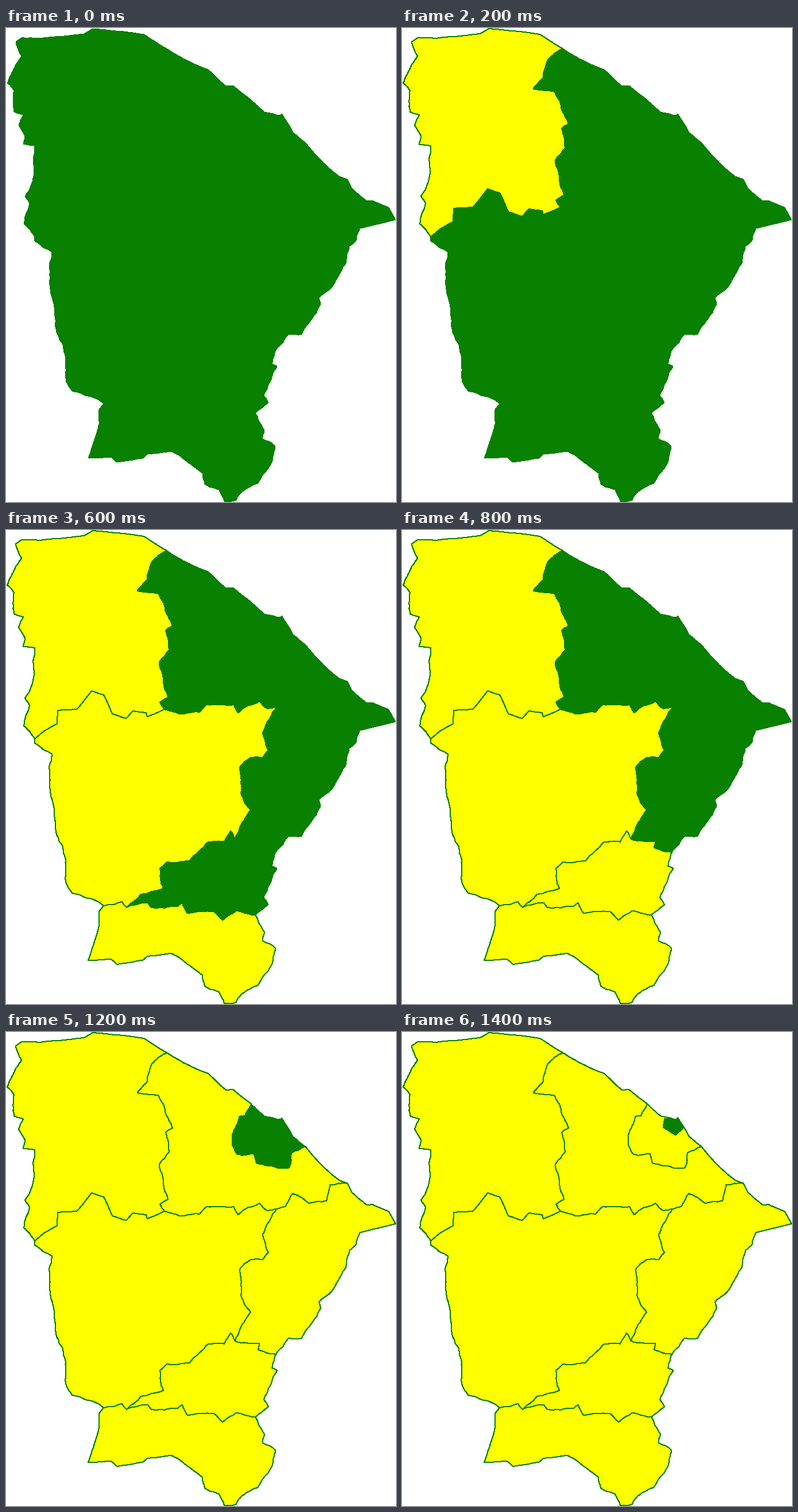
A matplotlib script for the animation above (1.6 s loop, 679 px wide and 825 px high).

```python
import numpy as np
import matplotlib.pyplot as plt
from matplotlib.animation import FuncAnimation
from matplotlib.patches import Polygon

W, H, DPI = 679, 825, 64
GREEN, YELLOW = "#088000", "#ffff00"
LINE = 1.0 * 72 / DPI
SMOOTH, RUGGED = 0.02, 0.07
rng = np.random.default_rng(4)


def roughen(p, q, rough):
    """Points from p up to q, bent by midpoint displacement."""
    d = q - p
    if np.hypot(*d) < 6:
        return [p]
    normal = np.array([-d[1], d[0]])
    middle = (p + q) / 2 + normal * rng.uniform(-rough, rough)
    return roughen(p, middle, rough) + roughen(middle, q, rough)


def border(rough, *corners):
    corners = np.array(corners, float)
    points = [pt for p, q in zip(corners, corners[1:]) for pt in roughen(p, q, rough)]
    return np.array(points + [corners[-1]])


# Meeting points of the regions
NW_W, NW_N, NW_N_W = (50, 364), (280, 36), (276, 312)
N_METRO, METRO_N, N_E = (427, 125), (521, 199), (594, 263)
N_W_E, W_E_C, E_C = (471, 308), (399, 538), (470, 561)
C_S, W_C_S, W_S = (434, 670), (210, 657), (170, 654)

# Outer boundary, clockwise from the west
northwest_edge = border(
    RUGGED, NW_W, (31, 341), (35, 322), (41, 306), (33, 293), (49, 250), (50, 205),
    (30, 203), (33, 188), (22, 169), (30, 151), (14, 146), (14, 109), (2, 96),
    (27, 49), (17, 24))
northwest_coast = border(
    SMOOTH, (17, 24), (27, 17), (60, 18), (136, 10), (151, 1), (205, 6), (240, 11), NW_N)
north_coast = border(
    SMOOTH, NW_N, (308, 53), (352, 72), (383, 101), (395, 100), N_METRO)
metro_coast = border(
    SMOOTH, N_METRO, (450, 146), (478, 153), (480, 149), (500, 182), METRO_N)
east_coast = border(SMOOTH, METRO_N, (552, 234), (580, 258), N_E)
cape = border(SMOOTH, N_E, (602, 279), (628, 301), (638, 300), (666, 312), (678, 334))
east_edge = border(
    RUGGED, (616, 349), (610, 369), (598, 380), (592, 409), (574, 440), (545, 470),
    (548, 481), (515, 533), (492, 533), E_C)
southeast_edge = border(RUGGED, E_C, (463, 585), (472, 589), (449, 640), (457, 652), C_S)
south_edge = border(
    RUGGED, C_S, (450, 700), (447, 715), (469, 728), (462, 758), (438, 793),
    (411, 807), (401, 822), (380, 824), (371, 804), (346, 794), (342, 775))
southwest_edge = border(
    SMOOTH, (342, 775), (300, 743), (288, 737), (246, 742), (238, 749), (193, 756),
    (183, 747), (143, 749), (162, 689), (162, 664), W_S)
west_edge = border(
    RUGGED, W_S, (156, 645), (115, 632), (103, 607), (104, 575), (88, 530),
    (83, 480), (80, 390), (50, 371), NW_W)

# Borders between regions
northwest_north = border(
    RUGGED, NW_N, (254, 55), (245, 88), (229, 106), (266, 111), (278, 142),
    (290, 167), (278, 175), (284, 209), (267, 230), (276, 276), (282, 291),
    (268, 300), NW_N_W)
northwest_west = border(
    SMOOTH, NW_N_W, (246, 325), (244, 318), (221, 315), (209, 328), (185, 320),
    (170, 287), (149, 280), (123, 312), (90, 314), (89, 337), (66, 350), NW_W)
north_west = border(
    RUGGED, NW_N_W, (301, 320), (337, 317), (349, 304), (396, 304), (404, 318),
    (441, 298), (455, 311), N_W_E)
north_east = border(
    RUGGED, N_W_E, (486, 304), (499, 281), (527, 298), (558, 294), (564, 266), N_E)
west_east = border(
    RUGGED, N_W_E, (447, 352), (457, 384), (447, 396), (426, 396), (407, 413),
    (409, 458), (426, 488), (410, 511), W_E_C)
east_center = border(RUGGED, W_E_C, (441, 542), (439, 553), E_C)
west_center = border(
    RUGGED, W_E_C, (391, 524), (380, 543), (352, 543), (319, 576), (280, 578),
    (268, 589), (274, 624), (235, 634), W_C_S)
center_south = border(
    RUGGED, W_C_S, (247, 649), (253, 657), (299, 655), (307, 649), (316, 667),
    (362, 664), (377, 679), (400, 663), C_S)
west_south = border(RUGGED, W_C_S, (202, 647), W_S)
metro_inland = border(
    RUGGED, N_METRO, (416, 146), (406, 147), (396, 173), (394, 197), (403, 213),
    (432, 212), (436, 228), (457, 233), (493, 236), (497, 210), METRO_N)
capital = border(
    SMOOTH, (457, 150), (478, 152), (480, 149), (490, 168), (476, 180), (454, 166))

state = [northwest_edge, northwest_coast, north_coast, metro_coast, east_coast, cape,
         east_edge, southeast_edge, south_edge, southwest_edge, west_edge]

# Regions in the order they light up
regions = [
    [northwest_edge, northwest_coast, northwest_north, northwest_west],
    [northwest_west[::-1], north_west, west_east, west_center, west_south, west_edge],
    [west_south[::-1], center_south, south_edge, southwest_edge],
    [west_center[::-1], east_center, southeast_edge, center_south[::-1]],
    [west_east[::-1], north_east, cape, east_edge, east_center[::-1]],
    [northwest_north[::-1], north_coast, metro_inland, east_coast,
     north_east[::-1], north_west[::-1]],
    [metro_coast, metro_inland[::-1]],
]

fig = plt.figure(figsize=(W / DPI, H / DPI), dpi=DPI, facecolor="white")
ax = fig.add_axes([0, 0, 1, 1])
ax.set(xlim=(0, W), ylim=(H, 0))
ax.axis("off")


def add_area(borders, fill, width=0):
    patch = Polygon(np.vstack(borders), closed=True, fc=fill, ec=GREEN, lw=width,
                    antialiased=False, joinstyle="round", snap=False)
    return ax.add_patch(patch)


add_area(state, GREEN)
areas = [add_area(borders, YELLOW, LINE) for borders in regions]
add_area([capital], GREEN)


def update(frame):
    for i, area in enumerate(areas):
        area.set_visible(i < frame)
    return areas


anim = FuncAnimation(fig, update, frames=len(regions) + 1, interval=200,
                     repeat=True, repeat_delay=0, blit=False)
plt.show()
```
